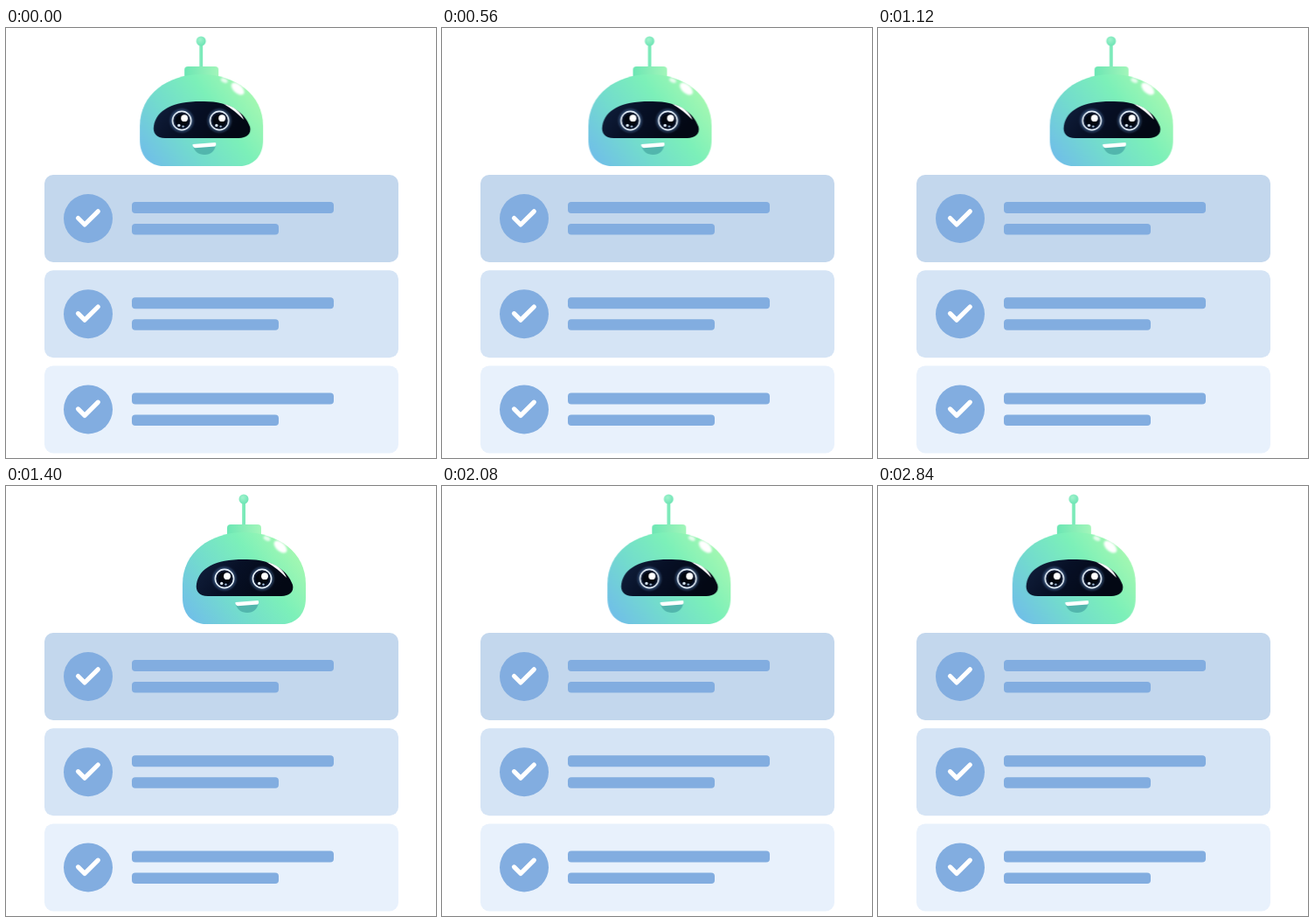
Animation of 492x492 px, one loop 2.88 s. Source, as an HTML page:

```html
<!DOCTYPE html>
<html lang="en">
<head>
<meta charset="utf-8">
<title>Robot over checklist</title>
<style>
  html, body { margin: 0; width: 100%; height: 100%; overflow: hidden; background: #fff; }
  svg { display: block; width: 100%; height: 100%; }
</style>
</head>
<body>
<svg viewBox="0 0 492 492">
  <defs>
    <linearGradient id="skin" gradientUnits="userSpaceOnUse" x1="162" y1="160" x2="284" y2="72">
      <stop offset="0" stop-color="#70bdea"/>
      <stop offset=".36" stop-color="#73dccd"/>
      <stop offset=".68" stop-color="#7cf0b9"/>
      <stop offset="1" stop-color="#a6f8b1"/>
    </linearGradient>
    <linearGradient id="cap">
      <stop offset="0" stop-color="#6ce6b4"/>
      <stop offset="1" stop-color="#a3f6ba"/>
    </linearGradient>
    <radialGradient id="ball" cx=".4" cy=".35" r=".7">
      <stop offset="0" stop-color="#a0f3cd"/>
      <stop offset="1" stop-color="#6be3b3"/>
    </radialGradient>
    <linearGradient id="glass" x1="0" y1="0" x2="1" y2=".3">
      <stop offset="0" stop-color="#12213f"/>
      <stop offset=".45" stop-color="#071026"/>
      <stop offset="1" stop-color="#030814"/>
    </linearGradient>
    <filter id="soft" x="-50%" y="-50%" width="200%" height="200%">
      <feGaussianBlur stdDeviation=".9"/>
    </filter>
    <g id="eye">
      <circle r="12" fill="none" stroke="#5a83b5" stroke-width="3" opacity=".45" filter="url(#soft)"/>
      <circle r="10.6" fill="#0a142a" stroke="#e4effa" stroke-width="1.7"/>
      <circle r="7.5" fill="#02060f"/>
      <circle cx="3" cy="-2.8" r="3.9" fill="#fff"/>
      <circle cx="-3.3" cy="5.4" r="1.7" fill="#dceaf8"/>
      <circle cx="1.5" cy="6.6" r="1.2" fill="#a9c4e2"/>
    </g>
    <g id="item" fill="#82ade0">
      <circle cx="94" cy="218" r="28"/>
      <path d="M82.5 217.5L90 225L105.3 209.8" fill="none" stroke="#fff" stroke-width="5.2"
        stroke-linecap="round" stroke-linejoin="round"/>
      <rect x="144" y="199" width="231" height="13" rx="4"/>
      <rect x="144" y="224" width="168" height="12.6" rx="4"/>
    </g>
  </defs>

  <g id="robot">
    <rect x="221.2" y="17" width="3.8" height="29" fill="#7beab9"/>
    <circle cx="223" cy="15" r="5.5" fill="url(#ball)"/>
    <path d="M204 56V48Q204 44 208 44H239Q243 44 243 48V56Z" fill="url(#cap)"/>
    <path d="M177 158C162 156 153 145 153 128V112C153 76 185 53 223 53C262 53 294 76 294 112V128C294 145 285 156 270 158Z" fill="url(#skin)"/>
    <g fill="#fff" filter="url(#soft)">
      <ellipse cx="265" cy="69.5" rx="9" ry="5" transform="rotate(42 265 69.5)"/>
      <ellipse cx="249.5" cy="60" rx="4.2" ry="2.4" transform="rotate(25 249.5 60)" opacity=".8"/>
    </g>
    <path d="M182 126C172 126 167.500 120 169 112C172 94 190 84 223 84C255 83 273 96 279 113C281 121 275 126 266 126Z" fill="url(#glass)"/>
    <path d="M249 87C260 89 269 96 272 105C265 98 258 92 249 87Z" fill="#fff"/>
    <use href="#eye" x="201" y="106"/>
    <use href="#eye" x="244" y="106"/>
    <path d="M214 135L240 133C239 141 234 145 227 145C220 145 215 141 214 135Z" fill="#52b6ad"/>
    <path d="M213.500 133L239.500 131Q241 133.500 239 135.500L216 137.300Q213 136 213.500 133Z" fill="#fff"/>
  </g>

  <g id="cards"></g>
</svg>
<script>
  const colors = ["#c3d7ed", "#d5e4f5", "#e8f1fc"];
  document.getElementById("cards").innerHTML = colors.map((fill, i) => `
    <g transform="translate(0 ${i * 109.2})">
      <rect x="44" y="168" width="405" height="100" rx="10" fill="${fill}"/>
      <use href="#item"/>
    </g>`).join("");

  const LOOP = 2880, START = 67, REACH = 49;
  const sine = "cubic-bezier(.37, 0, .63, 1)";
  // [time in the loop, horizontal offset]
  const steps = [[67, 0], [1412, REACH], [1632, REACH], [START + LOOP, 0]];
  document.getElementById("robot").animate(
    steps.map(([time, x]) => ({
      offset: (time - START) / LOOP,
      transform: `translateX(${x}px)`,
      easing: sine
    })),
    { duration: LOOP, delay: START - LOOP, iterations: Infinity }
  );
</script>
</body>
</html>
```
